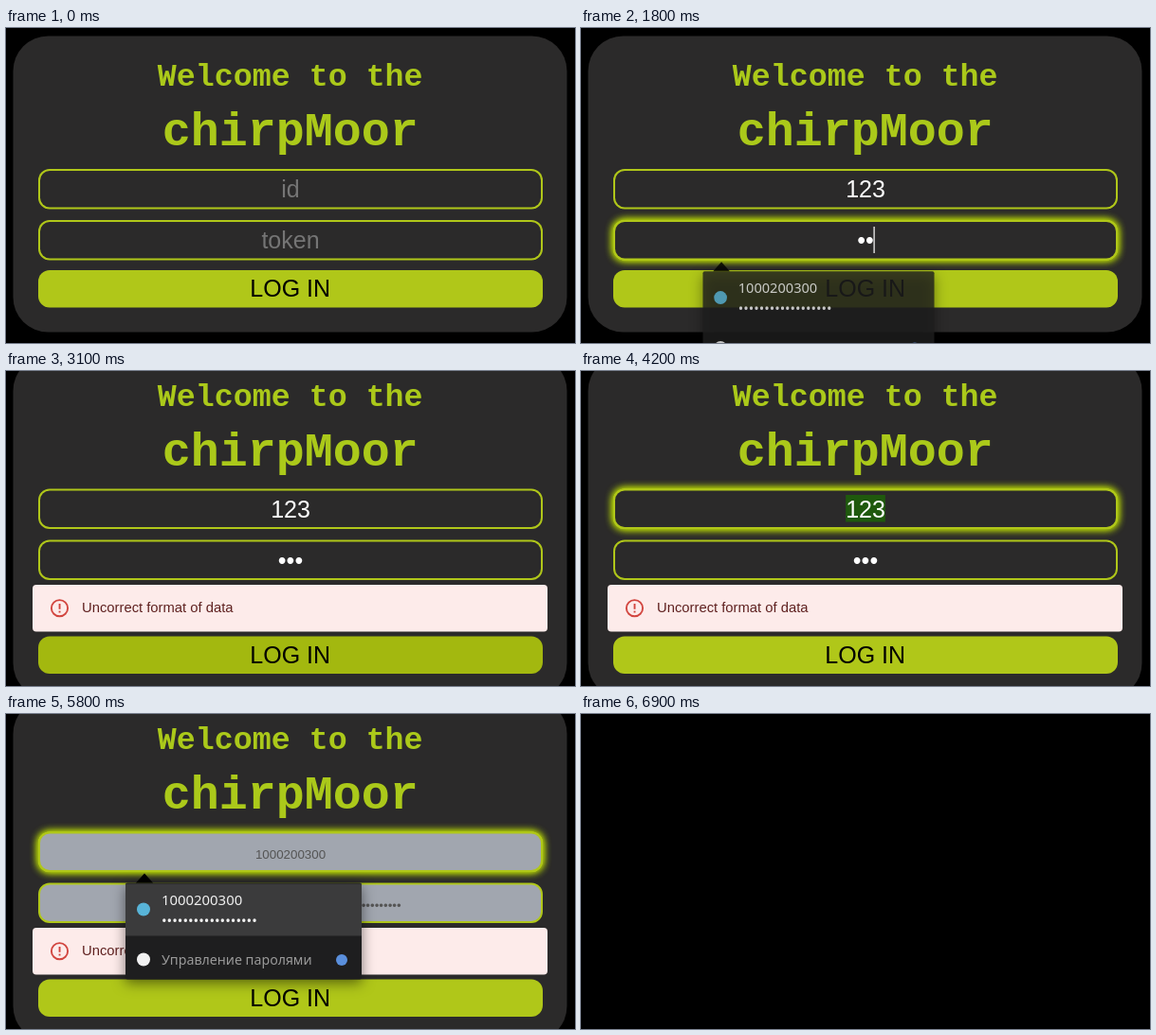
An HTML page with a canvas for the animation above (8.4 s loop, 600 px wide and 333 px high).

```html
<!DOCTYPE html>
<html lang="en">
<head>
<meta charset="utf-8">
<title>Login form</title>
<style>
  html, body { margin: 0; width: 100%; height: 100%; overflow: hidden; background: #000; }
  canvas { display: block; }
</style>
</head>
<body>
<canvas id="stage" width="600" height="333"></canvas>
<script>
const ctx = document.getElementById('stage').getContext('2d');
const LOOP = 8400, STEP = 100;
const SANS = '"Liberation Sans", Arial, sans-serif';
const MONO = '"Liberation Mono", monospace';
const MENU = '"Noto Sans", sans-serif';
const LIME = [176, 199, 25], OLIVE = [163, 184, 15];
const CARD = [43, 42, 42], FILLED = [232, 240, 254];
const ACCOUNT = '1000200300';
const bullets = n => '•'.repeat(n);

const ramp = (t, from, to) => Math.min(1, Math.max(0, (t - from) / (to - from)));
const pulse = (t, on, off, fade) => ramp(t, on, on + fade) - ramp(t, off, off + fade);
const within = (t, from, to) => t >= from && t < to;
const mix = (a, b, k) => `rgb(${a.map((v, i) => Math.round(v + (b[i] - v) * k))})`;

function box(x, y, w, h, r, fill) {
  ctx.beginPath();
  ctx.roundRect(x, y, w, h, r);
  ctx.fillStyle = fill;
  ctx.fill();
}

function dot(x, y, r, fill) {
  ctx.beginPath();
  ctx.arc(x, y, r, 0, Math.PI * 2);
  ctx.fillStyle = fill;
  ctx.fill();
}

function label(str, x, y, font, fill, align = 'center') {
  ctx.font = font;
  ctx.textAlign = align;
  ctx.fillStyle = fill;
  ctx.fillText(str, x, y);
}

function field(y, glow, fillAmount, content) {
  if (glow > 0) {
    ctx.save();
    ctx.shadowColor = `rgba(200, 236, 0, ${glow})`;
    ctx.shadowBlur = 9;
    for (let i = 0; i < 2; i++) box(34, y, 532, 42.5, 12, mix(LIME, LIME, 0));
    ctx.restore();
  }
  box(34, y, 532, 42.5, 12, mix(LIME, LIME, 0));
  box(36, y + 2, 528, 38.5, 10, mix(CARD, FILLED, fillAmount));

  const { text, color, small, selected, caret } = content;
  const font = `${small ? 13.33 : 25}px ${SANS}`;
  ctx.font = font;
  const width = ctx.measureText(text).width;
  if (selected) box(300 - width / 2, y + 6.5, width, 28.5, 0, '#1f590d');
  label(text, 300, y + (small ? 28.5 : 30), font, color);
  if (caret) box(Math.round(300 + width / 2) - 0.5, y + 7, 1.2, 28, 0, '#fff');
}

function idContent(t) {
  if (t < 900) return { text: 'id', color: '#757575' };
  if (t < 5000) {
    return {
      text: '123'.slice(0, Math.floor((t - 800) / 100)),
      color: '#fff', selected: t >= 4200, caret: t < 1500
    };
  }
  if (t < 5600) return { text: 'id', color: '#757575' };
  return t < 5900
    ? { text: ACCOUNT, color: '#555', small: true }
    : { text: ACCOUNT, color: '#000' };
}

function tokenContent(t) {
  if (t < 1700) return { text: 'token', color: '#757575' };
  if (t < 5600) {
    return { text: bullets(Math.min(3, Math.floor((t - 1600) / 100))), color: '#fff', caret: t < 2400 };
  }
  return t < 5900
    ? { text: bullets(50), color: '#555', small: true }
    : { text: bullets(50), color: '#000' };
}

// Saved-password popup hanging under the field whose top edge is fieldY.
function popup(fieldY, alpha, hovered) {
  if (alpha <= 0) return;
  const scale = 0.9 + 0.1 * alpha;
  ctx.save();
  ctx.globalAlpha = alpha;
  ctx.translate(250.5, fieldY + 100);
  ctx.scale(scale, 0.98 + 0.02 * alpha);
  ctx.translate(-250.5, -100);

  ctx.save();
  ctx.shadowColor = 'rgba(0, 0, 0, .5)';
  ctx.shadowBlur = 14;
  ctx.shadowOffsetY = 4;
  box(126, 54, 249, 102, 2, '#1e1e1f');
  ctx.restore();
  ctx.beginPath();
  ctx.moveTo(137, 54);
  ctx.lineTo(146, 44);
  ctx.lineTo(155, 54);
  ctx.fill();
  if (hovered) box(126, 55, 249, 55, 0, '#3b3b3c');

  dot(145, 82, 7, '#58b4d8');
  label(ACCOUNT, 164, 77, `14.9px ${MENU}`, '#f0f0f0', 'left');
  label(bullets(18), 164, 99, `14.9px ${MENU}`, '#f0f0f0', 'left');
  dot(145, 135, 7, '#f2f2f2');
  label('Управление паролями', 164, 140.5, `14.2px ${MENU}`, '#9a9a9a', 'left');
  dot(354, 135.5, 6, '#5a8fdc');
  ctx.restore();
}

function alertBar() {
  box(28, 226, 543, 49.5, 4, '#fdebea');
  ctx.beginPath();
  ctx.arc(56.5, 250.7, 8.6, 0, Math.PI * 2);
  ctx.strokeStyle = '#d2453f';
  ctx.lineWidth = 1.9;
  ctx.stroke();
  box(55.6, 246, 1.9, 5.8, 0, '#d2453f');
  box(55.6, 253.6, 1.9, 1.9, 0, '#d2453f');
  label('Uncorrect format of data', 80, 255, `14.8px ${SANS}`, '#5f2120', 'left');
}

function draw(t) {
  ctx.fillStyle = '#000';
  ctx.fillRect(0, 0, 600, 333);
  if (t >= 6900) return;

  const failed = t >= 2800;
  const shift = failed ? 24.5 : 0;
  const idY = 149 - shift, tokenY = 203 - shift;
  const filled = ramp(t, 5600, 5920);

  box(7.5, 8.5 - shift, 584, 313 + 2 * shift, 37, mix(CARD, CARD, 0));
  label('Welcome to the', 299.7, 61 - shift, `bold 33.3px ${MONO}`, '#abc91a');
  label('chirpMoor', 299.7, 124 - shift, `bold 50px ${MONO}`, '#abc91a');

  field(idY, pulse(t, 500, 1400, 300) + pulse(t, 3600, 6500, 300), filled, idContent(t));
  field(tokenY, pulse(t, 1400, 2500, 300), filled, tokenContent(t));
  if (failed) alertBar();

  const hover = pulse(t, 2100, 3200, 300) + ramp(t, 6300, 6600);
  box(34, 256 + shift, 532, 39.5, 12, mix(LIME, OLIVE, hover));
  label('LOG IN', 299.7, 284 + shift, `25px ${SANS}`, '#000');

  popup(idY, ramp(t, 500, 700) - ramp(t, 1060, 1260), false);
  popup(tokenY, ramp(t, 1400, 1600) - ramp(t, 1760, 1960), false);
  if (t >= 5000) popup(idY, 1 - ramp(t, 5860, 6060), within(t, 5600, 6100));
}

function tick(now) {
  draw(Math.floor((now % LOOP) / STEP) * STEP);
  requestAnimationFrame(tick);
}
requestAnimationFrame(tick);
</script>
</body>
</html>
```
